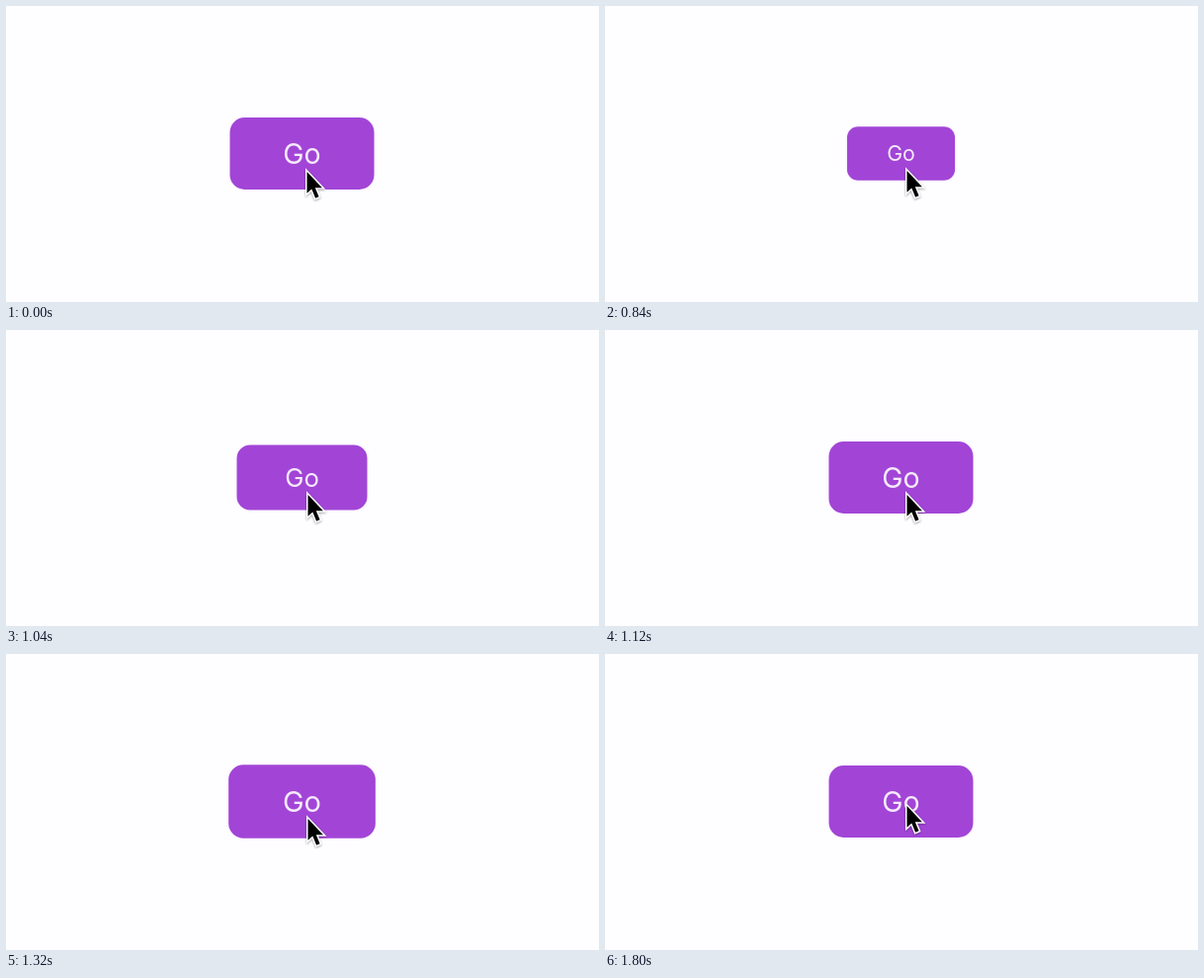
Animation of 600x300 px, one loop 1.96 s. Source, as an HTML page:

```html
<!DOCTYPE html>
<html>
<head>
<meta charset="utf-8">
<style>
html, body { margin: 0; width: 100%; height: 100%; overflow: hidden; background: #fefdff; }
svg { display: block; width: 600px; height: 300px; }
text { font: 400 28.5px Inter, sans-serif; fill: #f6ebfb; text-anchor: middle; }
#cursor { filter: drop-shadow(0 1px 1.2px rgba(0, 0, 0, .35)); }
#cursor path { stroke: #fff; stroke-width: 3; paint-order: stroke; }
</style>
</head>
<body>
<svg viewBox="0 0 600 300">
  <g id="button">
    <rect x="-73" y="-36.5" width="146" height="73" rx="15" fill="#a245d7"/>
    <text y="10.5">Go</text>
  </g>
  <g id="cursor"><path d="M1.5 3.6V25.3L6.3 20.9L10.1 30.2L13.6 28.7L9.8 19.8H16.9Z"/></g>
</svg>
<script>
const LOOP = 1960, STEP = 40;
const PRESS = 780, PRESS_TIME = 100, RELEASE = 897, SETTLED = 1500, DEPTH = 0.3;
const button = document.getElementById('button');
const cursor = document.getElementById('cursor');
const progress = (t, start, length) => Math.min(1, Math.max(0, (t - start) / length));

// Quick ease-out press, then an underdamped spring back to full size.
function buttonScale(t) {
  if (t >= SETTLED) return 1;
  if (t < RELEASE) return 1 - DEPTH * (1 - (1 - progress(t, PRESS, PRESS_TIME)) ** 2);
  const s = (t - RELEASE) / 1000, decay = 6.9, freq = 9.82;
  const swing = Math.cos(freq * s) + decay / freq * Math.sin(freq * s);
  return 1 - DEPTH * Math.exp(-decay * s) * swing;
}

function cursorPosition(t) {
  if (t < 520) return [303, 164.5];
  if (t < 560) return [304, 162.6];
  const p = progress(t, 1600, 200);
  return [304, 163.5 - 13 * p * p * (3 - 2 * p)];
}

function draw(now) {
  const t = Math.floor(now % LOOP / STEP) * STEP;
  button.setAttribute('transform', `translate(299.5 149.5) scale(${buttonScale(t)})`);
  cursor.setAttribute('transform', `translate(${cursorPosition(t)})`);
}

const start = performance.now();
function tick() {
  draw(performance.now() - start);
  requestAnimationFrame(tick);
}
tick();
</script>
</body>
</html>
```
